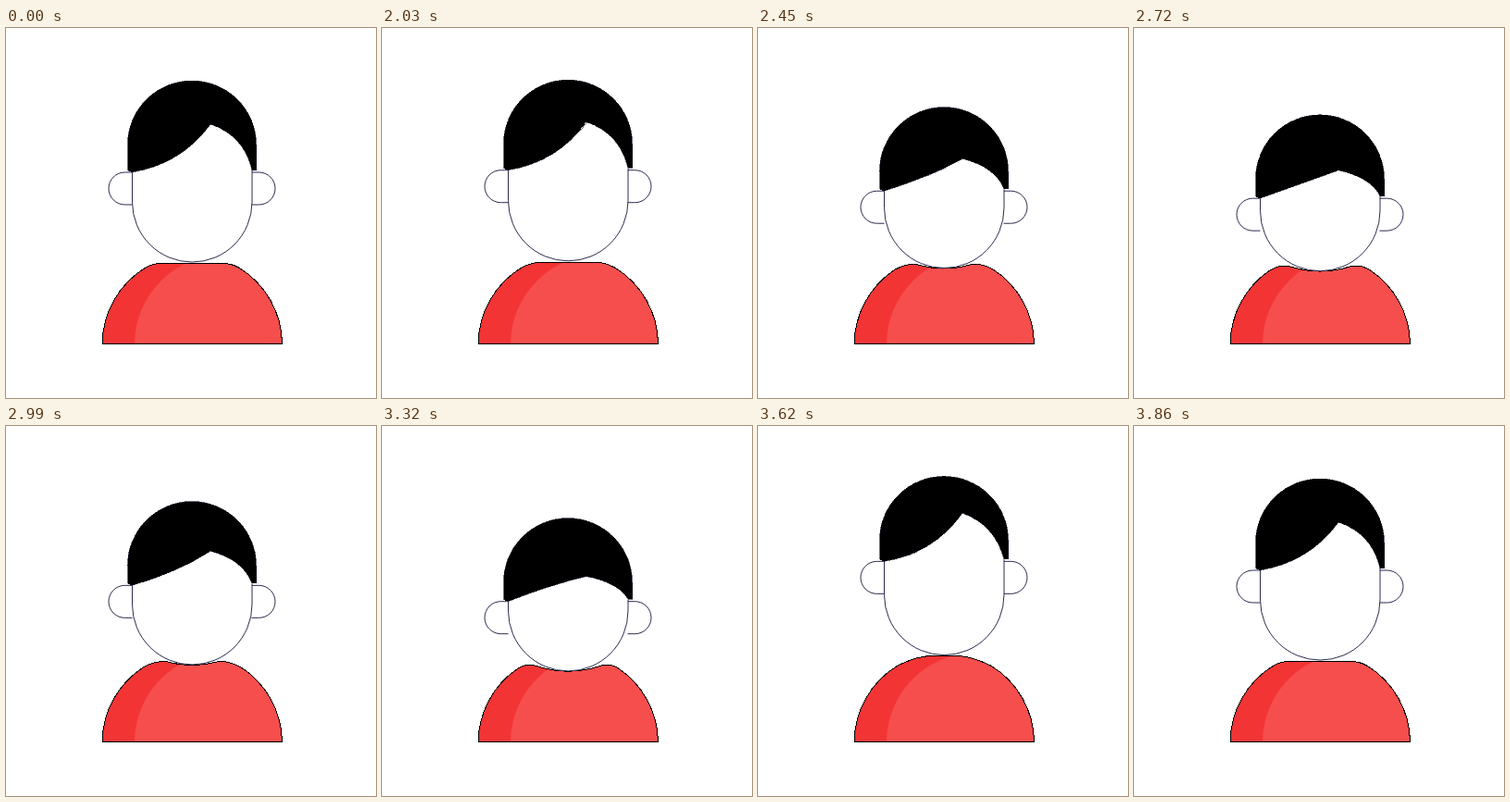
An HTML page that plays this animation: 400x400 px, repeating every 4100 ms.

```html
<!DOCTYPE html>
<html lang="en">
<head>
<meta charset="utf-8">
<title>Nodding figure</title>
<style>
  html, body { margin: 0; width: 100%; height: 100%; overflow: hidden; background: #fff; }
  svg { display: block; width: 100vw; height: 100vh; }
  .crisp { shape-rendering: crispEdges; }
</style>
</head>
<body>
<svg viewBox="0 0 400 400">
  <defs><clipPath id="shirtClip"><path class="shirt"/></clipPath></defs>
  <path class="shirt" fill="#f33434"/>
  <circle cx="236" cy="342" r="97" fill="#f54e4d" clip-path="url(#shirtClip)"/>
  <path class="shirt crisp" fill="none" stroke="#000"/>
  <g fill="#fff" stroke="#14143a" stroke-width=".9">
    <path id="ears"/>
    <path id="face"/>
  </g>
  <path id="hair" class="crisp" stroke="#0a0a20" stroke-width=".6"/>
</svg>
<script>
const LOOP = 4100, START = 2030, STEP = 30;

// Head heights, fringe and temple control points, then the left shoulder and neckline.
const rest = {
  top: 57, ear: 156, chin: 253, peak: 104, fringeX: 190, fringeY: 147, templeX: 257, templeY: 116,
  ax: 151, ay: 259, qx: 159, qy: 254.5, bx: 168, by: 254.5, cx: 185, neck: 254.5
};
const up = {
  top: 53, ear: 145, chin: 247, peak: 92, fringeX: 190, fringeY: 137, templeX: 256, templeY: 105,
  ax: 151, ay: 259, qx: 173, qy: 248.2, bx: 188, by: 248.2, cx: 195, neck: 248
};
const down = {
  top: 100, ear: 190, chin: 265, peak: 163, fringeX: 185, fringeY: 171, templeX: 256, templeY: 170,
  ax: 147, ay: 262, qx: 157, qy: 256, bx: 166, by: 259.3, cx: 184, neck: 265.3
};

const mix = (a, b, k) =>
  Object.fromEntries(Object.keys(a).map(key => [key, a[key] + (b[key] - a[key]) * k]));
const easeOut = x => Math.sin(x * Math.PI / 2);
const easeInOut = x => (1 - Math.cos(x * Math.PI)) / 2;

const half = mix(up, down, 0.59);
const keys = [
  [2000, rest], [2225, up, easeOut], [2584, down], [2942, half],
  [3301, down], [3660, up], [3860, rest]
];

function poseAt(time) {
  if (time < START) return rest;
  const t = START + Math.floor((time - START) / STEP) * STEP;
  const i = keys.findIndex(([end]) => t < end);
  if (i < 1) return rest;
  const [from, a] = keys[i - 1];
  const [to, b, ease = easeInOut] = keys[i];
  return mix(a, b, ease((t - from) / (to - from)));
}

const shirts = document.querySelectorAll('.shirt');
const [ears, face, hair] = ['ears', 'face', 'hair'].map(id => document.getElementById(id));
const flip = x => 402.6 - x;

function draw(time) {
  const p = poseAt(time);
  const jaw = p.chin - 65, crown = p.top + 69;

  const shirt = `M104.1 341.5A97.2 97.2 0 0 1 ${p.ax} ${p.ay}
    Q${p.qx} ${p.qy} ${p.bx} ${p.by} Q${p.cx} ${p.neck} 201.3 ${p.neck}
    Q${flip(p.cx)} ${p.neck} ${flip(p.bx)} ${p.by}
    Q${flip(p.qx)} ${p.qy} ${flip(p.ax)} ${p.ay}A97.2 97.2 0 0 1 298.5 341.5Z`;
  shirts.forEach(path => path.setAttribute('d', shirt));

  ears.setAttribute('d', `M136.5 ${p.ear}H128.5a17.5 17.5 0 0 0 0 35H136.5
    M265.5 ${p.ear}H273.5a17.5 17.5 0 0 1 0 35H265.5`);

  face.setAttribute('d', `M136.5 ${p.ear}V${jaw}A64.7 65 0 0 0 266 ${jaw}V${p.ear - 2}`);

  hair.setAttribute('d', `M131.5 ${p.ear - 2}V${crown}
    A69.5 69 0 0 1 270.5 ${crown}V${p.ear - 2.5}H266
    Q${p.templeX} ${p.templeY} 221 ${p.peak}
    Q${p.fringeX} ${p.fringeY} 136 ${p.ear}Z`);
}

const begin = performance.now();
function tick() {
  draw((performance.now() - begin) % LOOP);
  requestAnimationFrame(tick);
}
tick();
</script>
</body>
</html>
```
